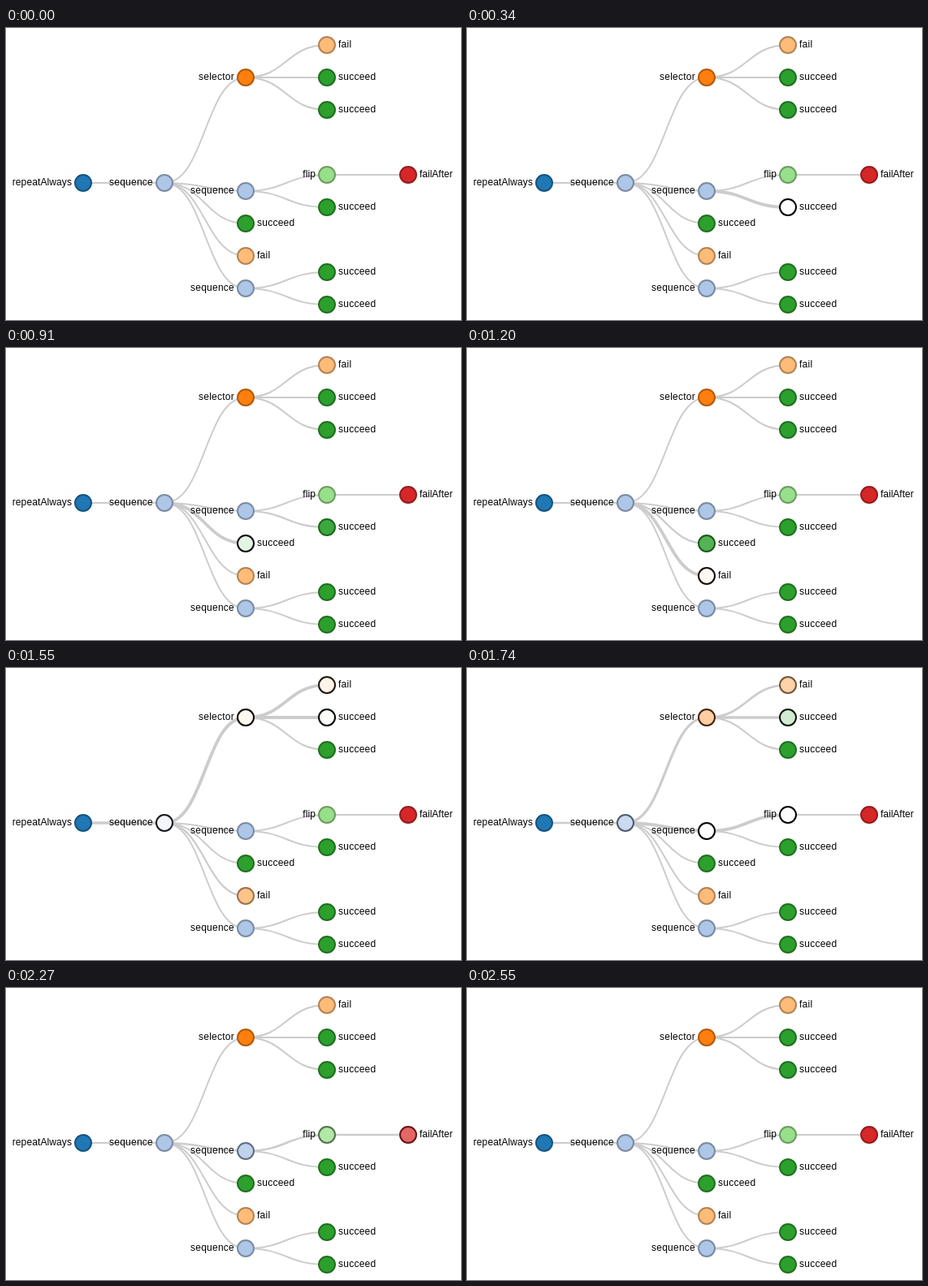
Recreate the animation shown at these times as an HTML page. Size 560 by 360 pixels, loop 2.74 s.

```html
<!DOCTYPE html>
<html lang="en">
<head>
<meta charset="utf-8">
<title>Behavior tree</title>
<style>
html, body { margin: 0; width: 100%; height: 100%; overflow: hidden; background: #fff; }
svg { display: block; }
path { fill: none; stroke: #ccc; }
circle { stroke-width: 2px; }
text { font: 12px "Liberation Sans", Arial, sans-serif; fill: #000; }
</style>
</head>
<body>
<svg id="stage" width="560" height="360" viewBox="0 0 560 360"></svg>
<script>
const LOOP = 2740, FADE = 900;
const THIN = 2, THICK = 4;

// fill colour and letter spacing per kind of node
const KINDS = {
  repeatAlways: [[31, 119, 180], 0.1],
  sequence: [[174, 199, 232], 0.25],
  selector: [[255, 127, 14], 0.25],
  fail: [[255, 187, 120], 0.25],
  succeed: [[44, 160, 44], 0.25],
  flip: [[152, 223, 138], 0.1],
  failAfter: [[214, 39, 40], 0]
};

const node = (kind, y, flash, ...kids) => ({ kind, y, flash, kids });

// flash: the moment (ms) at which a node is visited
const tree = node("repeatAlways", 191, null,
  node("sequence", 191, 1240,
    node("selector", 61, 1330,
      node("fail", 21, 1240),
      node("succeed", 61, 1400),
      node("succeed", 101, null)),
    node("sequence", 201, 1710,
      node("flip", 181, 1730,
        node("failAfter", 181, 1750)),
      node("succeed", 221, 250)),
    node("succeed", 241, 630),
    node("fail", 281, 940),
    node("sequence", 321, null,
      node("succeed", 301, null),
      node("succeed", 341, null))));

const stage = document.getElementById("stage");

function add(parent, tag, attrs) {
  const el = document.createElementNS("http://www.w3.org/2000/svg", tag);
  for (const key in attrs) el.setAttribute(key, attrs[key]);
  return parent.appendChild(el);
}

const links = add(stage, "g");
const dots = add(stage, "g");
const nodes = [];

function build(n, depth, parent) {
  n.x = 95 + 100 * depth;
  const [color, spacing] = KINDS[n.kind];
  n.color = color;
  if (parent) {
    const mid = (parent.x + n.x) / 2;
    n.link = add(links, "path", {
      d: `M${parent.x},${parent.y}C${mid},${parent.y} ${mid},${n.y} ${n.x},${n.y}`
    });
  }
  n.dot = add(dots, "circle", { cx: n.x, cy: n.y, r: 10 });
  const inner = n.kids.length > 0;
  add(dots, "text", {
    x: n.x + (inner ? -14 : 14),
    y: n.y + 3,
    "text-anchor": inner ? "end" : "start",
    "letter-spacing": spacing
  }).textContent = n.kind;
  nodes.push(n);
  n.kids.forEach(kid => build(kid, depth + 1, n));
}

const cubicInOut = t => t < 0.5 ? 4 * t ** 3 : 1 - 4 * (1 - t) ** 3;

// 1 at the flash, easing back to 0
function glow(n, time) {
  if (n.flash === null || time < n.flash) return 0;
  return 1 - cubicInOut(Math.min(1, (time - n.flash) / FADE));
}

const rgb = c => `rgb(${c.map(Math.round).join(",")})`;

function draw(time) {
  for (const n of nodes) {
    const g = glow(n, time);
    n.dot.setAttribute("fill", rgb(n.color.map(v => v + (255 - v) * g)));
    n.dot.setAttribute("stroke", rgb(n.color.map(v => v * 0.7 * (1 - g))));
    if (n.link) n.link.setAttribute("stroke-width", THIN + (THICK - THIN) * g);
  }
}

build(tree, 0, null);
draw(0);

const start = performance.now();
function tick() {
  draw((performance.now() - start) % LOOP);
  requestAnimationFrame(tick);
}
requestAnimationFrame(tick);
</script>
</body>
</html>
```
